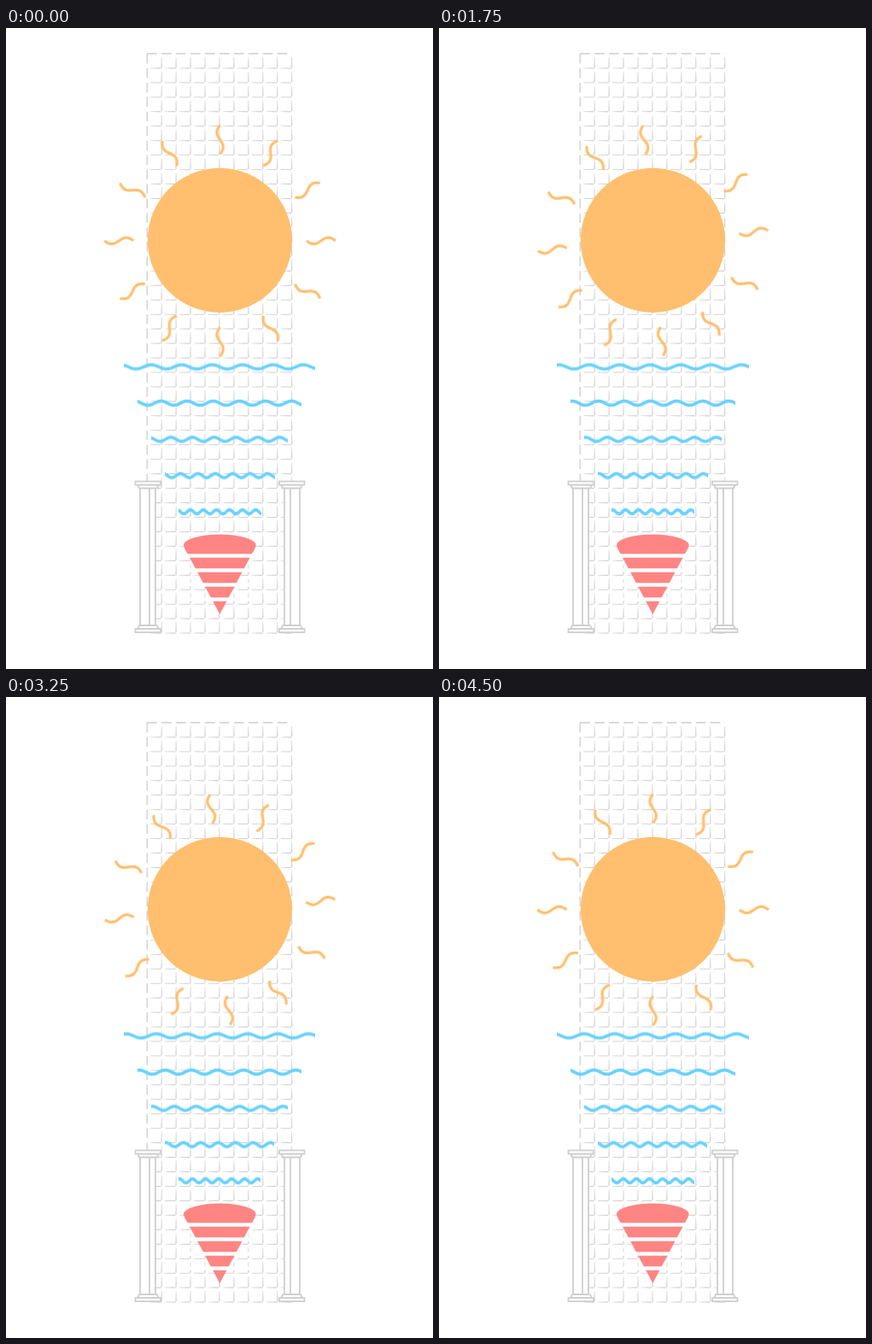
Write an HTML page that moves like this. It is 500x750 px and loops after 4550 ms.

```html
<!DOCTYPE html>
<html lang="en">
<head>
<meta charset="utf-8">
<title>Sun and waves</title>
<style>
  html, body { margin: 0; width: 100%; height: 100%; overflow: hidden; background: #fff; }
  svg.stage { display: block; width: 100%; height: 100%; }
  .grid { fill: #cecece; }
  .edge { fill: none; stroke: #cecece; stroke-width: 1.3; stroke-dasharray: 11.5 5.45; }
  .sun { fill: #ffbf6e; }
  .rays { fill: none; stroke: #ffbf6e; stroke-width: 3.2; animation: spin 4550ms steps(91) infinite; }
  .wave { fill: none; stroke: #69d2ff; stroke-width: 3.7; animation: drift 4550ms steps(91) infinite; }
  .pillar { fill: #fff; stroke: #cfcfcf; stroke-width: 1.8; }
  .cone { fill: #ff8584; }
  .gap { fill: #fff; }
  /* 91 ticks: one degree and 1/30 wavelength each */
  @keyframes spin { to { transform: rotate(-91deg); } }
  @keyframes drift { to { transform: translateX(var(--run)); } }
</style>
</head>
<body>
<svg class="stage" viewBox="0 0 500 750">
  <defs>
    <g id="cap">
      <path d="M154 534.5H179L177 538.5H156Z"/>
      <rect x="151.5" y="530.5" width="29.5" height="4"/>
    </g>
    <g id="pillar" class="pillar">
      <rect x="157" y="538" width="18" height="161"/>
      <path d="M168 538V699"/>
      <use href="#cap"/>
      <use href="#cap" transform="matrix(1 0 0 -1 0 1237.6)"/>
    </g>
  </defs>

  <path class="grid" id="grid"/>
  <path class="edge" d="M165.2 30V708M165.2 30H335"/>
  <use href="#pillar"/>
  <use href="#pillar" transform="matrix(-1 0 0 1 501 0)"/>

  <circle class="sun" cx="250.4" cy="248.4" r="84.6"/>
  <g transform="translate(250.6 248.9)">
    <g class="rays" id="rays"></g>
  </g>

  <g id="waves"></g>

  <path class="cone" d="M208 605A42.3 12.5 0 0 1 292.6 605Q292.6 608 288 615L250.3 686L212.6 615Q208 608 208 605Z"/>
  <g class="gap" id="gaps"></g>
</svg>

<script>
  const NS = 'http://www.w3.org/2000/svg';
  const byId = id => document.getElementById(id);

  function add(parent, tag, attrs) {
    const el = document.createElementNS(NS, tag);
    for (const key in attrs) el.setAttribute(key, attrs[key]);
    parent.appendChild(el);
    return el;
  }

  function line(count, point) {
    return 'M' + Array.from({ length: count + 1 }, (_, i) =>
      point(i).map(v => v.toFixed(2)).join(' ')).join('L');
  }

  // Tile edges swell towards their lower right corner
  const tile = 16.95, left = 165.2, top0 = 30;
  let grid = '';
  for (let row = 0; row <= 40; row++) {
    for (let col = 0; col <= 10; col++) {
      const x = left + col * tile, y = top0 + row * tile;
      if (col && row) {
        grid += `M${x + 0.6} ${y - 0.7}v1.4L${x - 13} ${y + 0.3}v-.6Z`;
        grid += `M${x - 0.7} ${y + 0.6}h1.4L${x + 0.3} ${y - 13}h-.6Z`;
      }
    }
  }
  byId('grid').setAttribute('d', grid);

  const ray = line(24, i => {
    const s = i / 24;
    return [-3.7 * Math.sin(s * 2 * Math.PI), -135.3 + 34 * s];
  });
  for (let a = 0; a < 360; a += 30) {
    add(byId('rays'), 'path', { d: ray, transform: `rotate(${a})` });
  }

  // Phase is measured from the middle; the left part drifts into view
  for (let n = 0; n < 5; n++) {
    const width = 224 - 32 * n, len = width / (2 * Math.PI);
    const box = add(byId('waves'), 'svg', {
      x: 250.2 - width / 2, y: 386.5 + 42.4 * n, width, height: 20, overflow: 'hidden'
    });
    const wave = add(box, 'path', {
      class: 'wave',
      d: line(264, i => [width / 2 + (i / 24 - 7) * len, 10 + 2.4 * Math.sin(i * Math.PI / 12)])
    });
    wave.style.setProperty('--run', len * 91 / 30 + 'px');
  }

  for (let n = 0; n < 4; n++) {
    add(byId('gaps'), 'rect', { x: 205, y: 615.3 + 17 * n, width: 90, height: 4.4 });
  }
</script>
</body>
</html>
```
